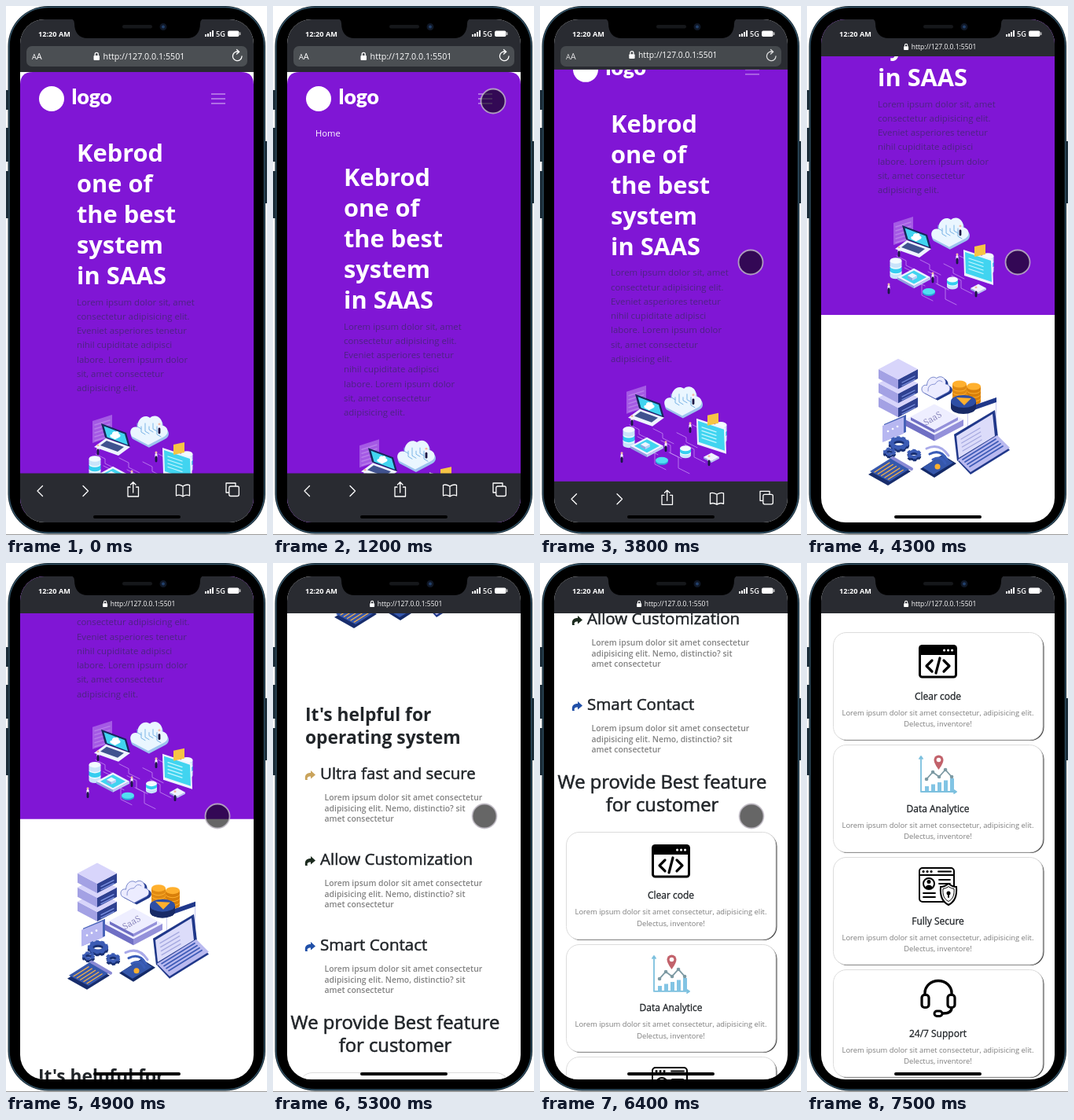
Animation, 332 px wide and 673 px high, one loop 8200 ms. Source, as an HTML page:

```html
<!DOCTYPE html>
<html lang="en">
<head>
<meta charset="utf-8">
<title>Phone page demo</title>
<style>
  html, body { margin: 0; width: 100%; height: 100%; overflow: hidden; background: #fff; }
  svg { display: block; width: 332px; height: 673px; }
  text { font-family: "Open Sans", "Noto Sans", sans-serif; white-space: pre; }
  .line, .ink { fill: none; stroke: #fff; stroke-width: 1.3; stroke-linecap: round; stroke-linejoin: round; }
  .ink { stroke: #000; }
  .mid { text-anchor: middle; }
  .medium { fill: #212529; stroke: #212529; stroke-width: .025em; }
</style>
</head>
<body>
<svg viewBox="0 0 332 673">
  <defs>
    <clipPath id="screen"><rect x="18" y="17" width="297" height="640" rx="31"/></clipPath>
    <clipPath id="menuClip"><rect id="menuBox" x="18" y="146" width="297" height="0"/></clipPath>
    <path id="share" d="M0 12C-1 5 2 3 7 3V0L13 5.500 7 10.500V7.500C3 7.500 2 9 3 12Z"/>
    <path id="cloud" d="M-20 8C-25 2-20-5-14-3C-14-12-6-19 1-14C8-20 17-13 15-5C23-4 24 5 18 8L-1 18Z"/>
    <path id="shield" d="M0-12Q5-8 10-8C11 3 8 11 0 15C-8 11-11 3-10-8Q-5-8 0-12Z"/>
  </defs>

  <path d="M0 672.500H332" stroke="#9a9a9a"/>
  <path d="M1.500 107v25M1.500 155v43M1.500 210v60M330.500 172v79" stroke="#1d2f3b" stroke-width="3"/>
  <rect x="2.500" y="0" width="327.500" height="671.500" rx="51" fill="#101e27"/>
  <rect x="4" y="1.500" width="324.500" height="668.500" rx="49.500" stroke="#35566a" stroke-width="1.300"/>

  <g clip-path="url(#screen)">
    <rect x="18" y="17" width="297" height="640" fill="#fff"/>
    <g id="page">
      <path id="hero" fill="#8016d5"/>
      <circle cx="58" cy="118" r="16" fill="#fff"/>
      <text x="83.500" y="125" font-size="26.500" font-weight="900" fill="#fff" style="font-family:Lato,sans-serif">logo</text>
      <path d="M261 112h18m-18 6h18m-18 6h18" stroke="#fff" stroke-opacity=".5" stroke-width="1.300"/>
      <g id="menu" clip-path="url(#menuClip)"></g>
      <g id="rest"></g>
    </g>

    <g id="bottom">
      <rect x="18" y="594.500" width="297" height="66" fill="#292b31"/>
      <g class="line">
        <path d="M46.500 610.500L40 617L46.500 623.500M98 610.500L104.500 617L98 623.500"/>
        <path d="M158 612H155V624H168.500V612H165.500M161.700 619V606M158.500 609L161.700 605.800L165 609"/>
        <path d="M225 611Q220 608 216.500 609.500V623Q221 621 225 624Q229 621 233.500 623V609.500Q230 608 225 611V624"/>
        <path d="M283.500 619H280V607H292V610.500"/>
        <rect x="283.800" y="611" width="12.500" height="12.500" rx="2"/>
      </g>
    </g>

    <rect id="top" x="18" y="17" width="297" fill="#292b31"/>
    <g id="bar">
      <rect x="26" y="51" width="281" height="26" rx="7" fill="#4b4f53"/>
      <text x="33" y="68" font-size="9" fill="#fff">A<tspan font-size="11">A</tspan></text>
      <path class="line" d="M300 64A5.800 5.800 0 1 1 296 58.300M293.500 55.500L296.700 58.300L293.500 61"/>
    </g>
    <g id="address" fill="#fff">
      <rect x="-64" y="-1" width="7.500" height="6" rx="1"/>
      <path class="line" d="M-62.300 -1V-2.500A2 2 0 0 1 -58.200 -2.500V-1"/>
      <text class="mid" y="4" font-size="10.700">http://127.0.0.1:5501</text>
    </g>
    <g fill="#fff" font-size="9.200">
      <text x="41" y="38.500" font-weight="700">12:20 AM</text>
      <path d="M253 36h2v3h-2zM256 35h2v4h-2zM259 33h2v6h-2zM262 31h2v8h-2z"/>
      <text x="267" y="38.500" font-weight="600">5G</text>
      <rect x="282" y="31.500" width="14.500" height="7.500" rx="2"/>
      <path d="M297.300 33.500h1v3.500h-1z"/>
    </g>
    <path d="M82 16H252Q247 17 247 22C247 34 241 41 230 41H104C93 41 87 34 87 22Q87 17 82 16Z"/>
    <rect x="148" y="24" width="38" height="4.500" rx="2.200" fill="#15171a"/>
    <circle cx="200" cy="26.500" r="3.200" fill="#22406b" stroke="#101827" stroke-width="2.500"/>
    <rect x="111" y="648" width="111" height="4" rx="2"/>
    <circle id="touch" r="15.500" fill="#000" fill-opacity=".6" stroke="#c4bfc8" stroke-opacity=".8" stroke-width="1.800"/>
  </g>
</svg>

<script>
const $ = id => document.getElementById(id);
const repeat = (n, make) => Array.from({ length: n }, (_, i) => make(i)).join('');
const text = (s, x, y, size, attrs = '') => `<text x="${x}" y="${y}" font-size="${size}" ${attrs}>${s}</text>`;
const lines = (list, x, y, step, size, attrs) => repeat(list.length, i => text(list[i], x, y + i * step, size, attrs));
const shift = (y, s) => `<g transform="translate(0 ${y})">${s}</g>`;
const path = (d, attrs = '') => `<path d="${d}" ${attrs}/>`;
const ink = (d, width = 2) => path(d, `class="ink" style="stroke-width:${width}"`);
const stroke = (d, color, width = 1) =>
  path(d, `fill="none" stroke="${color}" stroke-width="${width}" stroke-linecap="round" stroke-linejoin="round"`);
const shape = (id, x, y, scale, attrs) => `<use href="#${id}" transform="translate(${x} ${y}) scale(${scale})" ${attrs}/>`;

// Parallelogram from one corner and two edge vectors
const sheet = (x, y, ux, uy, vx, vy, fill) => path(`M${x} ${y}l${ux} ${uy} ${vx} ${vy} ${-ux} ${-uy}z`, `fill="${fill}"`);
// Isometric block: (x, y) is the centre of its top, a its half width, h its height
const block = (x, y, a, h, [top, left, right]) => {
  const b = a * .53;
  return sheet(x - a, y, a, b, 0, h, left) + sheet(x, y + b, a, -b, 0, h, right) + sheet(x - a, y, a, -b, a, b, top);
};
const drum = (x, y, r, h, side, top) =>
  path(`M${x - r} ${y}v${h}a${r} ${r / 2} 0 0 0 ${2 * r} 0v${-h}z`, `fill="${side}"`) +
  `<ellipse cx="${x}" cy="${y}" rx="${r}" ry="${r / 2}" fill="${top}"/>`;
const pile = (n, x, y, r, step, sides, top) =>
  repeat(n, i => drum(x, y - i * step, r, step * .8, sides[i % sides.length], top));
const rows = (n, x, y, dx, dy, ux, uy, color, width) =>
  repeat(n, i => stroke(`M${x + i * dx} ${y + i * dy}l${ux} ${uy}`, color, width));
const person = (x, y) =>
  `<circle cx="${x}" cy="${y - 5}" r="1.500" fill="#f2b9a6"/>` +
  stroke(`M${x} ${y - 2.5}v3`, '#f5f2ff', 3) + stroke(`M${x} ${y + 1}v5`, '#1b1745', 2.8);
const gear = (x, y, r) => [['#182f72', 3], ['#3b5bb4', 0]].map(([c, dy]) =>
  `<ellipse cx="${x}" cy="${y + dy}" rx="${r}" ry="${r * .6}" fill="none" stroke="${c}" stroke-width="${r * .55}"/>` +
  `<ellipse cx="${x}" cy="${y + dy}" rx="${r * 1.3}" ry="${r * .8}" fill="none" stroke="${c}" stroke-width="3" stroke-dasharray="4 3"/>`).join('');

const pale = ['#eef4ff', '#8fa5e0', '#bccdf4'], lilac = ['#d8d5fb', '#a3a1e4', '#2f4191'], chip = ['#eeeeff', '#6f6fc4', '#9491da'];
const blues = ['#c9e4fa', '#35cdf0'], navy = '#20388a', sky = '#41d4f0', orange = '#ffb02e';

const cloudTeam =
  repeat(10, i => stroke(`M${114 + i * 10} ${318 + i * 3 % 8 * 5}l12 6v${6 + i % 3 * 4}l14 7`, '#c58ff2', .8)) +
  sheet(110, 276, 25, -8, 0, 28, '#a45ae4') + rows(5, 113, 281, 0, 5, 19, -6, '#b87deb', 1.5) +
  sheet(121, 279, 32, 12, 5, 18, '#17275c') + sheet(124.5, 282.5, 26.5, 10, 4, 14, sky) +
  shape('cloud', 139, 294, .3, 'fill="#fff"') +
  sheet(127, 298, 31, 11, -15, 11, pale[0]) + sheet(128, 301, 22, 8, -8, 6, '#40528f') +
  shape('cloud', 183, 290, 1.1, 'fill="#9dc3ee"') + shape('cloud', 182, 287, 1.08, 'fill="#eaf6ff"') +
  repeat(6, i => stroke(`M${167 + i * 5} ${279 + i % 2 * 4}v${4 + i % 3 * 3}l5 3`, '#7bb4e6')) +
  pile(3, 113, 338, 7.5, 7, blues, '#f2fbff') + pile(3, 230, 332, 7.5, 7, blues, '#f2fbff') + pile(2, 185, 353, 7, 5, blues, '#f2fbff') +
  block(136, 345, 21, 3, pale) + block(136, 345, 16, 0, [sky]) + block(134, 343, 6, 3, pale) +
  sheet(199, 310, 37, 12, 1, 33, pale[0]) + sheet(201, 313, 33, 11, 1, 27, sky) +
  rows(4, 206, 321, 0, 4.5, 18, 6, '#c5f6ff', 1.3) +
  sheet(213, 306, 14, -3, 0, 13, '#f6c445') +
  block(218, 359, 10, 2, pale) + drum(155, 363, 8, 2, '#2aa8d8', '#52dff2') +
  person(117, 312) + person(195, 285) + person(160, 345) + person(104, 359) + person(191, 321) + person(215, 363);

const saasKit =
  repeat(3, i => block(116, 498 - i * 18, 25, 12, lilac) +
    rows(2, 121, 515 - i * 18, 0, 4, 16, -8, '#7d92e0', 1.3)) +
  shape('cloud', 167, 487, .82, `fill="${navy}"`) +
  shape('cloud', 164, 485, .82, 'fill="#ececff" stroke="#5d6fc0"') + stroke('M154 490q-1-9 9-9q4-7 9-3', '#8c97d6') +
  pile(4, 194, 496, 9, 5, ['#e08a12'], orange) + pile(4, 212, 499, 9, 5, ['#d87f0a'], orange) +
  sheet(204, 511, 37, -13, 0, 32, '#c9cbf2') + sheet(205, 513, 35, -12, 0, 29, '#fff') + sheet(204, 511, 37, -13, 0, 6, navy) +
  drum(199, 503, 16, 8, '#182a66', '#2e4fa5') + path('M190 498l19 1-9 9z', `fill="${orange}"`) +
  block(162, 526, 37, 8, chip) + block(162, 523, 30, 4, chip) +
  `<text transform="translate(151 534) rotate(-30)" font-size="11" fill="#8a87bd" style="font-family:'Noto Serif',serif">SaaS</text>` +
  sheet(187, 545, 52, -31, 4, 34, navy) + sheet(190, 547, 46, -28, 3, 28, '#dcdcfa') +
  rows(4, 196, 551, .7, 5, 24, -14, '#a5a9e0', 1.3) +
  sheet(192, 579, 50, -31, 16, 17, navy) + sheet(192, 577, 50, -31, 16, 16, '#b9b9ef') +
  rows(4, 198, 577, 3, 3, 42, -26, '#3f5cb8', 1.8) +
  sheet(98, 532, 28, -12, 0, 22, '#4863b8') + sheet(96, 534, 27, -11, 0, 21, '#b7b7f1') +
  rows(3, 103, 541, 6, -3, .1, 0, '#fff', 2.6) +
  gear(117, 556, 9) + gear(105, 567, 5) + gear(136, 570, 6) +
  sheet(78, 596, 29, -18, 25, 14, '#182d6c') + sheet(80, 592, 27, -17, 25, 13, '#3658ad') +
  rows(5, 86, 593, 4.3, 2.3, 19, -12, '#ffb440', 1.2) + stroke('M109 575l24 14', '#8a8ad4', 4) +
  sheet(144, 589, 28, -18, 18, 11, '#142a68') + sheet(147, 587, 25, -15, 14, 9, '#3557ab') +
  `<circle cx="166" cy="586" r="3.500" fill="${orange}"/>` +
  repeat(3, i => stroke(`M${160 - i * 4} ${577 - i * 7}q${11 + i * 3}-${6 + i} ${16 + i * 6} ${5 + i * 2}`, i < 2 ? '#3a5db8' : '#a9aae9', 3));

const benefit = (title, color, i) => shift(109 * i,
  `<use href="#share" x="41" y="264" fill="${color}"/>` +
  text(title, 60, 275, 20.5, 'class="medium"') +
  lines(['Lorem ipsum dolor sit amet consectetur', 'adipisicing elit. Nemo, distinctio? sit', 'amet consectetur'],
    65.5, 302, 13.6, 10.4, 'font-weight="600" fill="#828282"'));
const benefits =
  lines(["It's helpful for", 'operating system'], 41, 201, 29, 22.8, 'font-weight="700" fill="#212529"') +
  benefit('Ultra fast and secure', '#c9a35b', 0) +
  benefit('Allow Customization', '#1c2b1f', 1) +
  benefit('Smart Contact', '#2150a8', 2) +
  lines(['We provide Best feature', 'for customer'], 155.5, 593, 29, 23.8, 'class="mid medium"');

const peak = i => 275 - (i % 2 * 9 + (i > 1 ? 3 : 0));
const icons = [
  '<rect class="ink" style="stroke-width:3" x="143.500" y="105.500" width="46" height="39.500" rx="3"/>' +
    '<rect x="143" y="105" width="47" height="12"/>' + rows(3, 174.5, 111, 5, 0, .1, 0, '#fff', 3) +
    ink('M159 124l-7 7 7 7m15-14l7 7-7 7m-5-17l-5 19', 3.2),
  stroke('M145 247V291H189m-46-42l2-3 2 3m40 40l3 2-3 2', '#7cc0de', 1.8) +
    repeat(5, i => `<rect x="${150 + i * 8}" y="${284 - i * 2.5}" width="5" height="${6 + i * 2.5}" fill="#82c4e4"/>`) +
    repeat(5, i => stroke(`M${152 + i * 8} ${peak(i)}h.1`, '#7d9aa3', 4.5) +
      (i ? stroke(`M${144 + i * 8} ${peak(i - 1)}L${152 + i * 8} ${peak(i)}`, '#7d9aa3', 1.8) : '')) +
    path('M167.500 263Q161.500 255 161.500 250.500a6 6 0 0 1 12 0Q173.500 255 167.500 263z', 'fill="#c2626b"') +
    '<circle cx="167.500" cy="250.500" r="2.800" fill="#fff"/>',
  '<rect class="ink" style="stroke-width:2" x="143" y="388" width="44" height="43" rx="4"/>' +
    ink('M143 397H187') + rows(3, 148, 392.5, 5, 0, .1, 0, '#000', 3) + ink('M167 392.500h16') +
    '<circle class="ink" style="stroke-width:2" cx="155" cy="408" r="7"/><circle cx="155" cy="405.500" r="2.500"/>' +
    path('M150 412.500q5-6 10 0q-5 4-10 0') + rows(2, 168, 403, 0, 5, 14, 0, '#000', 1.8) + rows(2, 148, 420, 0, 5, 15, 0, '#000', 1.8) +
    shape('shield', 180, 420, 1, 'fill="#fff" stroke="#000" stroke-width="2"') +
    shape('shield', 180, 420, .7, 'fill="none" stroke="#000" stroke-width="1.400"') +
    '<circle cx="180" cy="420" r="2.500"/>' + ink('M180 421v4'),
  ink('M150 549V547a17 15.500 0 0 1 34 0V549m0 17q0 7-11 7', 3.4) +
    repeat(2, i => `<rect class="ink" style="stroke-width:3.200" x="${146 + i * 33}" y="549.500" width="9" height="16" rx="3.500"/>`) +
    '<rect class="ink" style="stroke-width:3" x="162" y="570" width="10" height="6.500" rx="3.200"/>'
];
const cards = ['Clear code', 'Data Analytice', 'Fully Secure', '24/7 Support'].map((title, i) => {
  const y = 88.5 + 143 * i;
  return `<rect x="34.500" y="${y + 1}" width="267" height="136.500" rx="17" fill="#444"/>` +
    `<rect x="33.500" y="${y}" width="266.500" height="136.500" rx="16.500" fill="#fff" stroke="#dcdcdc"/>` +
    icons[i] +
    text(title, 166.5, y + 85, 12, 'class="mid medium"') +
    lines(['Lorem ipsum dolor sit amet consectetur, adipisicing elit.', 'Delectus, inventore!'],
      166.5, y + 105, 14.8, 9.4, 'class="mid" fill="#7d7d7d"');
}).join('');

$('menu').innerHTML =
  lines(['Home', 'Services', 'Pricing', 'Tesimonials', 'Blog'], 54, 166, 30.5, 11.2, 'fill="#fff"') +
  '<rect x="42" y="298" width="249" height="30" rx="3" fill="#17b8ce"/>' +
  text('FREE TRIAL', 166, 317, 10.5, 'class="mid" fill="#fff"');
$('rest').innerHTML =
  lines(['Kebrod', 'one of', 'the best', 'system', 'in SAAS'], 90, 198, 39, 30.8, 'font-weight="700" fill="#fff"') +
  lines(['Lorem ipsum dolor sit, amet', 'consectetur adipisicing elit.', 'Eveniet asperiores tenetur',
    'nihil cupiditate adipisci', 'labore. Lorem ipsum dolor', 'sit, amet consectetur', 'adipisicing elit.'],
    90, 380.5, 18.25, 11.4, 'fill="#4c2482"') +
  shift(252, cloudTeam + saasKit) + shift(779, benefits) + shift(1339, cards);

function draw(t) {
  // Eased 0 to 1 from a start time over a duration
  const ease = (start, length) => {
    const u = Math.min(1, Math.max(0, (t - start) / length));
    return u * u * (3 - 2 * u);
  };
  const move = (id, x, y, more = '') => $(id).setAttribute('transform', `translate(${x} ${y}) ${more}`);
  const open = 186 * (ease(1109, 350) - ease(2628, 350));
  const slim = ease(3700, 400);
  const scroll = 238 * slim + 28 * ease(4200, 200) + 513 * ease(4800, 500) + 259 * ease(5400, 500) + 301 * ease(6300, 400);
  const enter = ease(300, 700), drop = ease(3100, 300), nudge = ease(4600, 100);

  move('page', 0, -scroll);
  move('rest', 0, open);
  $('menuBox').setAttribute('height', open);
  $('hero').setAttribute('d', `M18 ${645 + open}V100Q18 84 34 84H299Q315 84 315 100V${645 + open}Z`);
  $('top').setAttribute('height', 67 - 20 * slim);
  $('bar').setAttribute('opacity', 1 - slim);
  move('address', 175.5 - 1.5 * slim, 64 - 12 * slim, `scale(${1 - .205 * slim})`);
  move('bottom', 0, 66 * slim);
  move('touch', 305 - 25 * enter - 12 * drop + nudge, 210 - 89 * enter + 205 * drop - 4 * nudge);
  $('touch').setAttribute('visibility', t >= 400 && t < 7500 ? 'visible' : 'hidden');
}

const begin = performance.now();
function tick() {
  // The picture advances in steps of 100 ms
  draw(Math.floor((performance.now() - begin) % 8200 / 100) * 100);
  requestAnimationFrame(tick);
}
tick();
</script>
</body>
</html>
```
